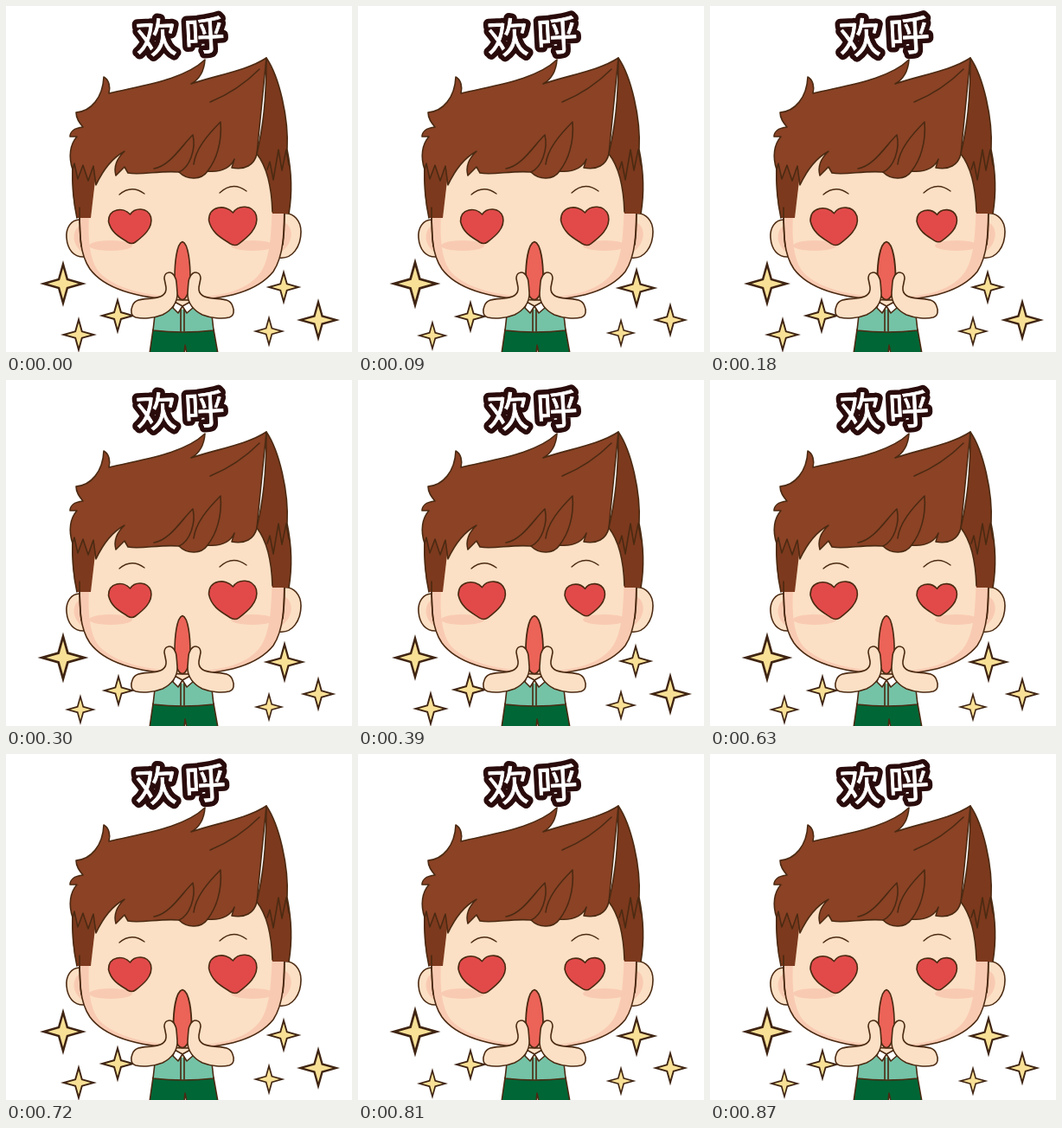
These frames come from a looping animation (400x400 px, 900 ms). An HTML page:

```html
<!DOCTYPE html>
<html lang="zh">
<head>
<meta charset="utf-8">
<title>欢呼</title>
<style>
  html, body { margin: 0; width: 100%; height: 100%; overflow: hidden; background: #fff; }
  svg { display: block; width: 100vw; height: 100vh; }
  .line { stroke: #4b2a12; stroke-width: 1.6; stroke-linejoin: round; stroke-linecap: round; }
  .open { fill: none; }
  .skin { fill: #fbe0c5; }
  .pink { fill: #f9cab2; }
  .hair { fill: #8b4225; }
  .side { fill: #7c391d; }
  .heart { fill: #e24a4a; }
  text { font: 400 48px "Noto Sans CJK SC", "Noto Sans CJK", sans-serif; text-anchor: middle; stroke-linejoin: round; }
</style>
</head>
<body>
<svg viewBox="0 0 400 400">
  <g id="title">
    <g transform="rotate(-3 201 34)">
      <text x="173 230" y="53" fill="#2a0b0b" stroke="#2a0b0b" stroke-width="12">欢呼</text>
      <text x="173 230" y="53" fill="#fff" stroke="#fff" stroke-width=".8">欢呼</text>
    </g>
  </g>

  <g id="stars"></g>

  <g id="body">
    <path class="line" fill="#006636" d="M170 374L166 402H206L207 392L209 402H245L240 374Z"/>
    <path class="line" fill="#74c3a7" d="M174 340L170 375Q205 379 240 375L236 340Z"/>
    <path class="skin" d="M196 334H213L211 346L204 351L197 346Z"/>
    <path class="line" fill="#fff" stroke-width="1" d="M195 342L193 349L199 355L204 347ZM213 342L216 349L209 355L204 347Z"/>
    <path class="line open" d="M202 351V376M206 351V376"/>
  </g>

  <g id="head">
    <path class="line skin" d="M85 247C75 247 69 257 70 268C71 281 78 291 91 290Z"/>
    <path class="pink" d="M85 254C76 260 76 276 88 284Z"/>
    <path class="line skin" d="M320 240C333 238 341 249 341 261C341 278 331 293 316 291Z"/>
    <path class="pink" d="M321 250C333 254 333 275 318 284Z"/>
    <path class="line pink" d="M85 215C85 262 84 285 97 304C114 327 150 338 204 340C258 340 292 328 309 307C321 289 322 265 322 215L290 160H120Z"/>
    <path class="skin" d="M102 180C93 250 92 289 108 308C126 327 162 335 204 337C246 337 276 330 292 311C306 294 309 262 307 180L280 150H120Z"/>
    <path class="side" d="M76 182Q75 218 82 245H98L105 185Z"/>
    <path class="line open" d="M77 185Q76 218 82 245M85 233Q85 260 87 278M322 240Q322 260 320 276"/>
    <path class="line hair" d="M77 189C72 174 74 160 82 151L74 151C74 146 78 141 89 140
      C85 135 81 130 81 123C98 122 112 106 113 82C119 85 121 94 119 101
      C155 92 205 86 230 62C229 76 223 85 214 90C243 80 278 75 301 60L290 171
      C287 184 276 190 261 187L264 177C258 190 245 192 233 191
      C226 201 210 202 200 192C177 190 156 196 141 193L137 186L127 196Q123 181 137 168
      C122 176 112 190 104 207L101 185L95 202L89 184L83 200L79 182Z"/>
    <path class="side" d="M301 60C316 82 327 130 325 166Q333 205 327 240H308C308 208 301 185 290 171C297 140 301 110 301 60Z"/>
    <path class="line open" d="M327 240Q333 205 325 166C327 130 316 82 301 60C301 110 297 140 290 171C301 185 307 206 308 238
      M302 189L305 180L309 201L315 166L319 190L324 166L327 184"/>
    <path class="line open" d="M236 111Q268 98 293 73
      M216 149C204 160 190 185 171 188M216 149C220 166 212 187 200 192
      M248 134C232 150 219 166 217 183M248 134C250 158 243 178 233 191"/>
    <path class="line open" d="M131 218Q145 206 160 217M247 216Q262 202 278 214" style="stroke-width:1.3"/>
    <ellipse class="pink" cx="121" cy="277" rx="25" ry="6"/>
    <ellipse class="pink" cx="285" cy="277" rx="25" ry="6"/>
    <path id="eyeL" class="line heart"/>
    <path id="eyeR" class="line heart"/>
    <path id="mouth" class="line" fill="#ec6358" d="M0 -33C7 -31 9 -7 9 9C9 24 4 34 0 34C-5 34 -9 24 -9 9C-9 -7 -7 -31 0 -33Z"/>
  </g>

  <g id="hands">
    <path id="hand" class="line skin" d="M146 347C149 338 159 339 169 338C179 337 186 334 185 325L183 315C183 308 189 307 192 309C198 313 197 322 198 331C199 343 191 352 181 357C171 361 158 362 150 360C144 358 144 352 146 347Z"/>
    <use href="#hand" transform="matrix(-1 0 0 1 408 0)"/>
  </g>
</svg>
<script>
  const STEP = 30, STEPS = 30;
  const $ = id => document.getElementById(id);

  // x, y, radius in the first pose, then in the second
  const STARS = [
    [66, 321, 27, 66, 321, 29.5],
    [84, 380, 21, 86, 381, 18],
    [129, 358, 21.5, 130, 359, 19.5],
    [321, 325, 20.5, 322, 326, 24.5],
    [361, 363, 25, 361, 363, 20.5],
    [304, 376, 18.5, 304, 378, 17.5]
  ];

  function starPath(x, y, r) {
    const pts = [];
    for (let i = 0; i < 8; i++) {
      const a = i * Math.PI / 4, d = i % 2 ? r * 0.31 : r;
      pts.push((x + d * Math.sin(a)).toFixed(2) + " " + (y - d * Math.cos(a)).toFixed(2));
    }
    return "M" + pts.join("L") + "Z";
  }

  function heartPath(cx, cy, w) {
    const s = w / 50, p = (x, y) => (cx + x * s).toFixed(2) + " " + (cy + y * s).toFixed(2) + " ";
    return "M" + p(0, -13) +
      "C" + p(5, -21) + p(20, -22) + p(24, -10) +
      "C" + p(27, 3) + p(14, 13) + p(6, 19) +
      "Q" + p(2, 22) + p(-3, 19) +
      "C" + p(-10, 14) + p(-22, 9) + p(-25, -5) +
      "C" + p(-25, -20) + p(-8, -22) + p(0, -13) + "Z";
  }

  function addPath(fill) {
    const el = document.createElementNS("http://www.w3.org/2000/svg", "path");
    el.setAttribute("fill", fill);
    return $("stars").appendChild(el);
  }
  const stars = STARS.map(() => [addPath("#3f2412"), addPath("#f8e096")]);

  function draw(now) {
    const n = Math.floor(now / STEP) % STEPS;
    const twinkle = Math.floor(n / 3) % 2;
    const beat = Math.floor(n / 3.75) % 2;
    const pulse = (1 - Math.cos(n * Math.PI / 5)) / 2;

    STARS.forEach((s, i) => {
      const [x, y, r] = s.slice(twinkle * 3, twinkle * 3 + 3);
      stars[i][0].setAttribute("d", starPath(x, y, r));
      stars[i][1].setAttribute("d", starPath(x, y, r * 0.66));
    });
    $("eyeL").setAttribute("d", heartPath(143.5, 254, beat ? 55 : 50));
    $("eyeR").setAttribute("d", heartPath(262.5, 253.5, beat ? 47 : 56));
    $("mouth").setAttribute("transform", `translate(204 305.5) scale(${1 + 0.18 * pulse} 1)`);
    $("title").setAttribute("transform", `translate(201 34) scale(${0.98 + 0.025 * pulse}) translate(-201 -34)`);
  }

  const start = performance.now();
  function tick() {
    draw(performance.now() - start);
    requestAnimationFrame(tick);
  }
  tick();
</script>
</body>
</html>
```
